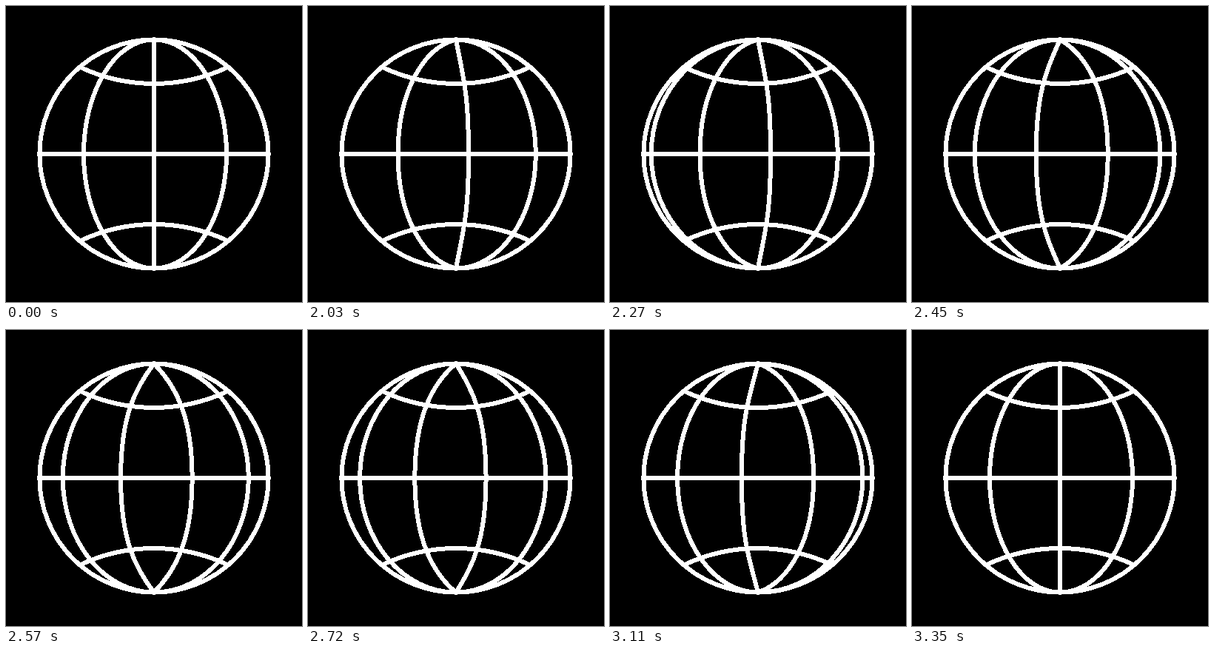
Animation of 400x400 px, one loop 3.44 s. Source, as an HTML page:

```html
<!DOCTYPE html>
<html lang="en">
<head>
<meta charset="utf-8">
<title>Spinning globe</title>
<style>
  html, body { margin: 0; width: 100%; height: 100%; overflow: hidden; background: #000; }
  svg { display: block; width: 100%; height: 100%; shape-rendering: crispEdges; }
  svg * { fill: none; stroke: #fff; stroke-width: 6; }
</style>
</head>
<body>
<svg viewBox="0 0 400 400">
  <circle cx="200" cy="200" r="154.6"/>
  <path d="M43 200H357M101 83A234 234 0 0 0 299 83M101 317A234 234 0 0 1 299 317"/>
  <path id="meridians"/>
</svg>
<script>
const LOOP = 3440, START = 2030, END = 3350, STEP = 30, TURNS = 7;
const CENTER = 200, RADIUS = 154.6, KAPPA = 0.5523;
const STOPS = [45.4, 105, 200, 298, 354.6];
const CRUISE_STEPS = 12, SPEED = 0.25;
const meridians = document.getElementById('meridians');
const mix = (a, b, p) => a + (b - a) * p;

// Number of meridian spacings travelled: steady spin, then a long slowdown.
function travelled(step) {
  const slowdown = n => TURNS - (0.0552 * (45.34 - n)) ** 2.2;
  return step > CRUISE_STEPS
    ? slowdown(step)
    : slowdown(CRUISE_STEPS) - SPEED * (CRUISE_STEPS - step);
}

// Morphs one stop into the next; the straight middle line has upright pole handles.
function meridian(from, to, p) {
  const x = mix(from, to, p);
  const poleX = mix(CENTER, x, KAPPA);
  const straight = mix(from === CENTER, to === CENTER, p);
  const poleY = RADIUS * (1 - 0.4 * straight);
  const midY = RADIUS * KAPPA;
  return `M200 ${CENTER - RADIUS}` +
    `C${poleX} ${CENTER - poleY} ${x} ${CENTER - midY} ${x} ${CENTER}` +
    `C${x} ${CENTER + midY} ${poleX} ${CENTER + poleY} 200 ${CENTER + RADIUS}`;
}

function draw(now) {
  const t = now % LOOP;
  const step = Math.floor((t - START) / STEP);
  const moving = t >= START && t < END;
  const p = moving ? travelled(step) % 1 : 0;
  // The incoming meridian appears one step after the spin begins.
  const first = moving && step > 0 ? 0 : 1;
  let d = '';
  for (let i = first; i < STOPS.length - 1; i++) d += meridian(STOPS[i], STOPS[i + 1], p);
  meridians.setAttribute('d', d);
}

const begin = performance.now();
function tick() {
  draw(performance.now() - begin);
  requestAnimationFrame(tick);
}
tick();
</script>
</body>
</html>
```
